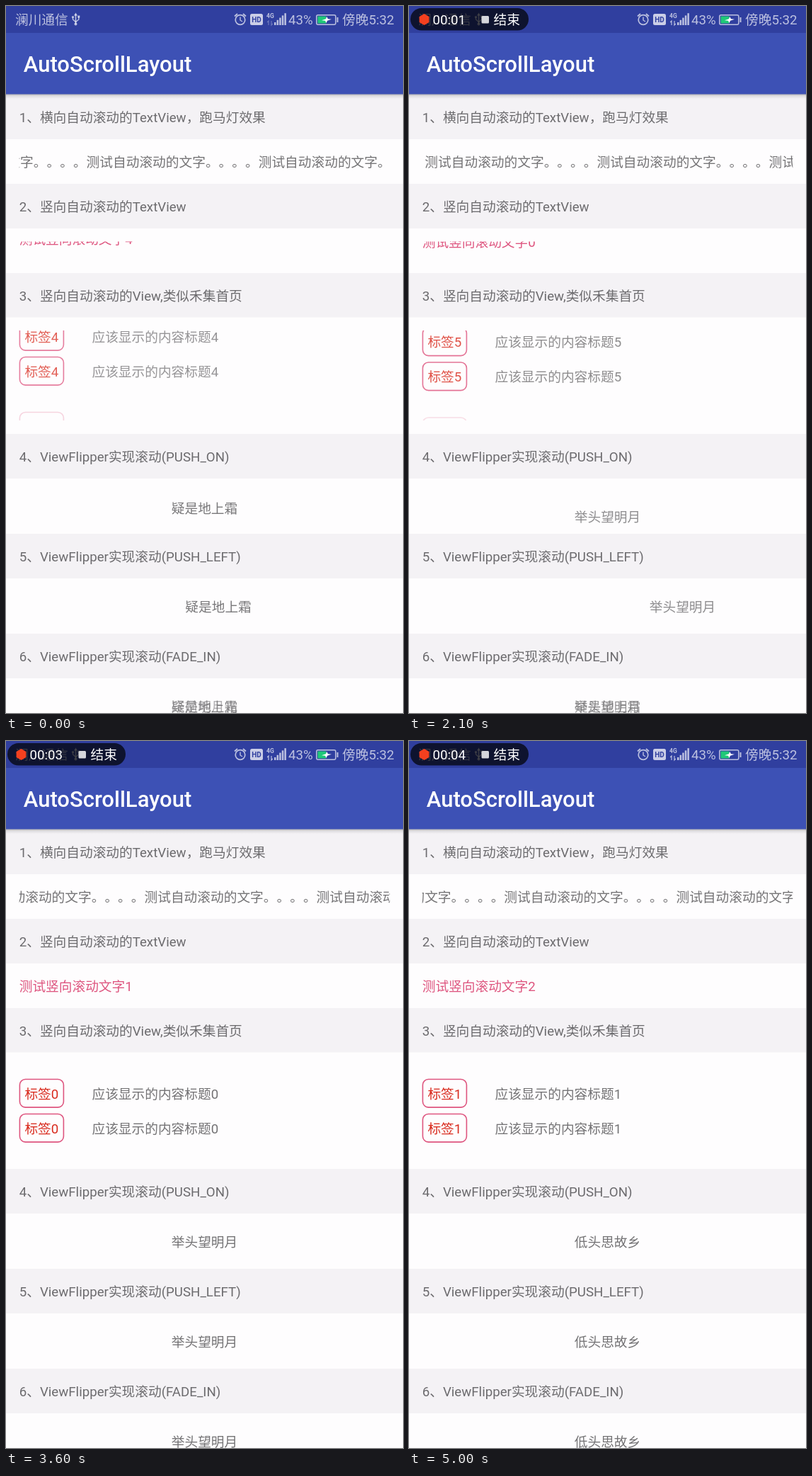
Animation of 561x998 px, one loop 5100 ms. Source, as an HTML page with a canvas:

```html
<!DOCTYPE html>
<html lang="zh-CN">
<head>
<meta charset="utf-8">
<style>
html, body { margin: 0; width: 100%; height: 100%; overflow: hidden; background: #fefdfe; }
canvas { display: block; width: 561px; height: 998px; }
</style>
</head>
<body>
<canvas id="stage" width="561" height="998"></canvas>
<script>
const ctx = document.getElementById('stage').getContext('2d');
const W = 561, H = 998, LOOP = 5100, STEP = 100;
const EM = 18.7;
const FAMILY = 'Roboto, "Noto Sans CJK SC", "Noto Sans CJK", sans-serif';
const GREY = '#747375', PINK = '#de557f', RED = '#d92b1e';
const STATUS = 'rgba(255,255,255,.68)';

const HEADERS = [
  [125, 63, '1、横向自动滚动的TextView，跑马灯效果'],
  [251, 63, '2、竖向自动滚动的TextView'],
  [377, 62.5, '3、竖向自动滚动的View,类似禾集首页'],
  [604, 63, '4、ViewFlipper实现滚动(PUSH_ON)'],
  [745, 63, '5、ViewFlipper实现滚动(PUSH_LEFT)'],
  [886, 63, '6、ViewFlipper实现滚动(FADE_IN)']
];
const POEM = ['床前明月光', '疑是地上霜', '举头望明月', '低头思故乡'];

// Loop time in ms against the phone's own clock in seconds.
const CLOCK = [[0, .329], [600, .809], [1300, 1.48], [2100, 2.283],
  [2900, 3.06], [4200, 4.398], [5000, 5.09], [5100, 5.18]];

function phoneTime(t) {
  const i = CLOCK.findIndex(([end]) => t < end);
  const [t0, a] = CLOCK[i - 1], [t1, b] = CLOCK[i];
  return a + (b - a) * (t - t0) / (t1 - t0);
}

function clamp(x) {
  return Math.min(1, Math.max(0, x));
}

// Accelerate, then decelerate.
function ease(x) {
  return (1 - Math.cos(Math.PI * clamp(x))) / 2;
}

function text(str, x, middle, color, size = EM, weight = 400) {
  ctx.font = `${weight} ${size}px ${FAMILY}`;
  ctx.fillStyle = color;
  ctx.fillText(str, x, middle + size * .355);
}

function rect(x, y, w, h, color) {
  ctx.fillStyle = color;
  ctx.fillRect(x, y, w, h);
}

function roundPath(x, y, w, h, r) {
  ctx.beginPath();
  ctx.roundRect(x, y, w, h, r);
}

function line(points, color, width) {
  ctx.beginPath();
  points.forEach(([x, y], i) => i ? ctx.lineTo(x, y) : ctx.moveTo(x, y));
  ctx.strokeStyle = color;
  ctx.lineWidth = width;
  ctx.stroke();
}

function disc(x, y, r, color) {
  ctx.beginPath();
  ctx.arc(x, y, r, 0, 7);
  ctx.fillStyle = color;
  ctx.fill();
}

function clipped(x, y, w, h, draw) {
  ctx.save();
  ctx.beginPath();
  ctx.rect(x, y, w, h);
  ctx.clip();
  draw();
  ctx.restore();
}

function faded(alpha, draw) {
  if (alpha <= 0) return;
  ctx.save();
  ctx.globalAlpha = alpha;
  draw();
  ctx.restore();
}

function usbIcon() {
  line([[98.5, 12], [98.5, 25]], STATUS, 1.6);
  line([[94.5, 16], [94.5, 19], [98.5, 22.5], [102.8, 19], [102.8, 15]], STATUS, 1.4);
  disc(98.5, 25.5, 2, STATUS);
  disc(94.5, 15.5, 1.6, STATUS);
  rect(101.3, 13.5, 3, 3, STATUS);
  ctx.beginPath();
  ctx.moveTo(98.5, 9.5);
  ctx.lineTo(101, 13.5);
  ctx.lineTo(96, 13.5);
  ctx.fill();
}

function alarmIcon() {
  ctx.beginPath();
  ctx.arc(331, 19.5, 6.8, 0, 7);
  ctx.strokeStyle = STATUS;
  ctx.lineWidth = 1.7;
  ctx.stroke();
  line([[331, 15.5], [331, 20], [334, 22]], STATUS, 1.4);
  line([[323, 14.5], [327, 11]], STATUS, 1.8);
  line([[335, 11], [339, 14.5]], STATUS, 1.8);
}

function batteryIcon() {
  roundPath(438.8, 12.8, 27, 13.4, 2);
  ctx.strokeStyle = STATUS;
  ctx.lineWidth = 1.5;
  ctx.stroke();
  rect(467.5, 16, 2, 7, STATUS);
  rect(440.5, 14.5, 12, 10, '#20c878');
  ctx.beginPath();
  [[446, 20.2], [452, 18.3], [453.2, 15], [455, 18.2], [460, 18.8],
    [454, 20.8], [452.6, 24], [451, 20.8]].forEach(p => ctx.lineTo(...p));
  ctx.fillStyle = '#fff';
  ctx.fill();
}

function statusBar(now) {
  rect(0, 0, W, 38, '#303f9f');
  text('澜川通信', 13, 19.8, STATUS);
  usbIcon();
  alarmIcon();
  roundPath(345, 11, 18, 16, 2.5);
  ctx.fillStyle = 'rgba(255,255,255,.75)';
  ctx.fill();
  text('HD', 347.2, 19.2, '#303f9f', 10, 700);
  text('4G', 368, 13.8, STATUS, 8.5, 700);
  const arrows = now > 1 ? STATUS : 'rgba(255,255,255,.3)';
  line([[371, 27], [371, 21], [369.2, 23]], arrows, 1.2);
  line([[375, 21], [375, 27], [376.8, 25]], arrows, 1.2);
  for (let i = 0; i < 5; i++) {
    const h = 4 + i * 3.2;
    rect(379 + i * 3.6, 27 - h, 2.5, h, STATUS);
  }
  text('43%', 399, 19.8, STATUS);
  batteryIcon();
  text('傍晚5:32', 475, 19.8, STATUS);
}

function recorderPill(now) {
  const elapsed = now - .44;
  if (elapsed < 0) return;
  roundPath(2, 3, 167, 31.5, 15.7);
  ctx.fillStyle = 'rgba(0,0,0,.7)';
  ctx.fill();
  if (elapsed > .5) {
    ctx.beginPath();
    for (let i = 0; i < 6; i++) {
      const a = Math.PI * (i / 3 + 1 / 6);
      ctx.lineTo(21.5 + 8 * Math.cos(a), 19 + 8 * Math.sin(a));
    }
    ctx.fillStyle = '#f4401f';
    ctx.fill();
  }
  text('00:0' + Math.floor(elapsed), 33.5, 19.6, '#fff');
  roundPath(102.5, 14, 10.5, 10.5, 1.5);
  ctx.fillStyle = '#d5d6dc';
  ctx.fill();
  text('结束', 119.5, 19.6, '#fff');
}

function appBar() {
  const shade = ctx.createLinearGradient(0, 124, 0, 131);
  shade.addColorStop(0, 'rgba(0,0,0,.3)');
  shade.addColorStop(.4, 'rgba(0,0,0,.09)');
  shade.addColorStop(1, 'rgba(0,0,0,0)');
  rect(0, 124, W, 7, shade);
  rect(0, 38, W, 86.5, '#3d51b5');
  text('AutoScrollLayout', 24.8, 82, '#fff', 31, 500);
}

// One full-width cell per character keeps the stops evenly spaced.
function marquee(now) {
  const phrase = [...'测试自动滚动的文字。。。。'];
  const travel = 46.7 * (now - .329) - 113.6;
  const first = Math.floor(travel / EM), last = first + Math.ceil(W / EM) + 1;
  clipped(18.7, 200, 523.6, 42, () => {
    for (let i = first; i <= last; i++) {
      const n = phrase.length;
      text(phrase[(i % n + n) % n], i * EM - travel, 220.5, GREY);
    }
  });
}

function verticalText(cycle, p) {
  const label = (n, dy) => text('测试竖向滚动文字' + (n + 5) % 5, 18.7, 346 + dy, PINK);
  clipped(18, 332.5, 525, 26, () => {
    label(cycle - 1, -70 * p);
    label(cycle, 40 * (1 - p));
  });
}

function tagPair(n, dy, alpha) {
  faded(alpha, () => {
    for (const y of [497.5 + dy, 546.5 + dy]) {
      roundPath(19.4, y - 20, 62, 39.6, 8);
      ctx.strokeStyle = PINK;
      ctx.lineWidth = 1.6;
      ctx.stroke();
      text('标签' + n, 26.4, y + .8, RED);
      text('应该显示的内容标题' + n, 121.5, y + .8, GREY);
    }
  });
}

function tagList(cycle, p) {
  const height = 127;
  clipped(18, 458, 525, height, () => {
    tagPair((cycle + 4) % 6, -height * p, 1 - p);
    tagPair((cycle + 5) % 6, height * (1 - p), p);
  });
}

function verse(n, dx, middle, alpha) {
  faded(alpha, () => text(POEM[n % 4], 233.8 + dx, middle, GREY));
}

// Pushes one verse out while the next comes in; dx and dy give the full travel.
function pushFlipper(cycle, p, top, middle, dx, dy) {
  clipped(0, top, W, 78, () => {
    verse(cycle, -dx * p, middle - dy * p, 1 - p);
    verse(cycle + 1, dx * (1 - p), middle + dy * (1 - p), p);
  });
}

function fadeFlipper(cycle, x, middle) {
  verse(cycle, 0, middle, 1 - x * x);
  verse(cycle + 1, 0, middle, 1 - (1 - x) ** 2);
}

function render(now) {
  const cycle = Math.floor(now / 2), phase = now - cycle * 2;
  const slide = ease(phase);
  const flip = phase - .086;
  const push = ease(flip / .276);

  rect(0, 0, W, H, '#fefdfe');
  for (const [y, h, title] of HEADERS) {
    rect(0, y, W, h, '#f4f2f5');
    text(title, 18.7, y + 32.3, '#6c6b6e');
  }
  marquee(now);
  verticalText(cycle, slide);
  tagList(cycle, slide);
  pushFlipper(cycle, push, 667, 707, 0, 78);
  pushFlipper(cycle, push, 808, 848, W, 0);
  fadeFlipper(cycle, clamp(flip / .37), 989);
  appBar();
  statusBar(now);
  recorderPill(now);
}

const start = performance.now();
function tick() {
  const t = (performance.now() - start) % LOOP;
  render(phoneTime(Math.floor(t / STEP) * STEP));
  requestAnimationFrame(tick);
}
tick();
</script>
</body>
</html>
```
